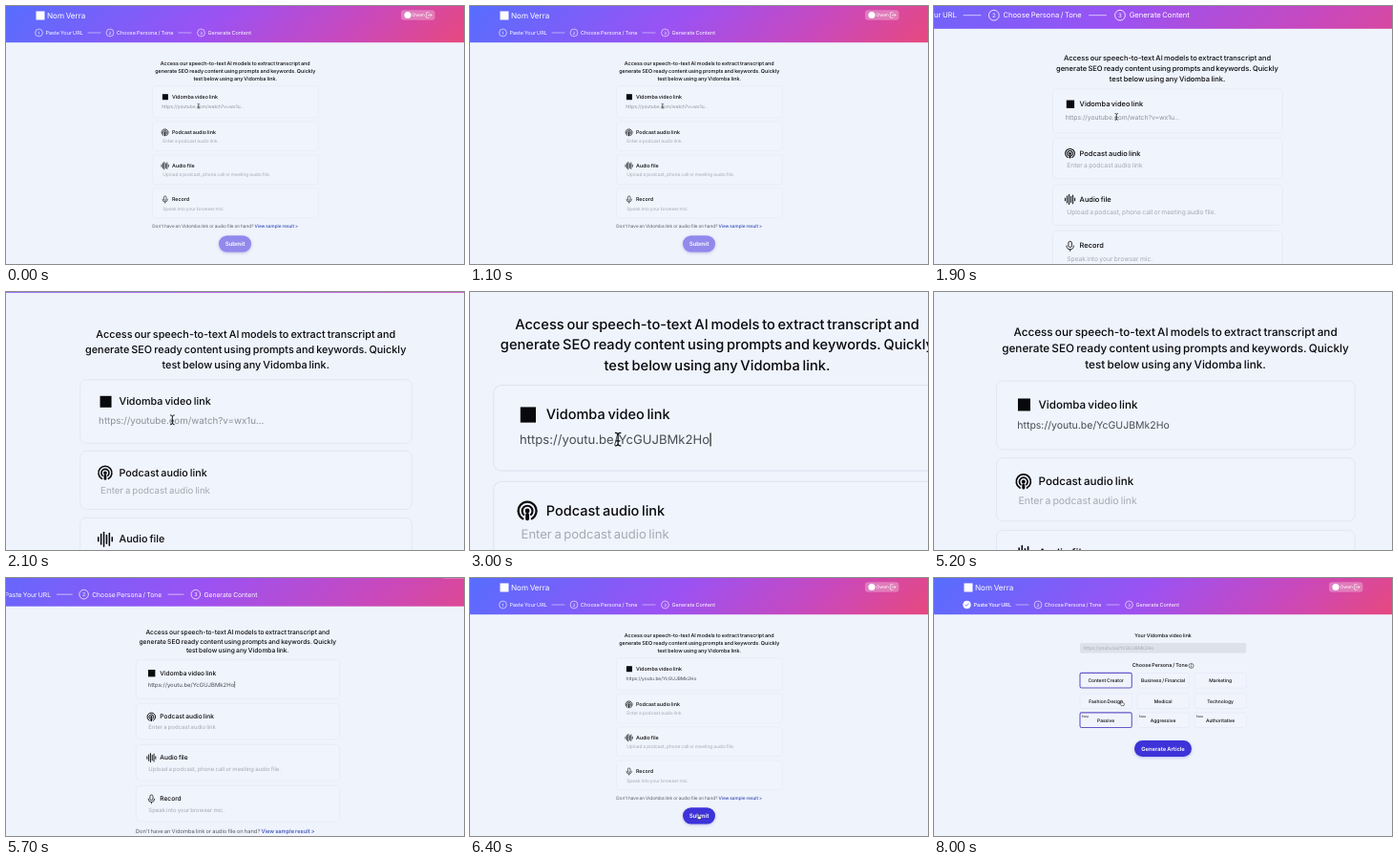
Write an HTML page that moves like this. It is 480 px wide and 270 px high and loops after 8100 ms.

```html
<!DOCTYPE html>
<html lang="en">
<head>
<meta charset="utf-8">
<title>Content generator demo</title>
<style>
  html, body { margin: 0; width: 100%; height: 100%; overflow: hidden; background: #eff3fc; }
  svg { display: block; width: 480px; height: 270px; }
  text { font-family: Inter, "Open Sans", sans-serif; word-spacing: -.08em; text-rendering: geometricPrecision; white-space: pre; }
  .button { filter: drop-shadow(0 1px 1.5px rgba(70, 60, 190, .3)); }
</style>
</head>
<body>
<svg id="stage" viewBox="0 0 480 270">
  <defs>
    <linearGradient id="banner" gradientUnits="userSpaceOnUse" x1="110.5" y1="-110.5" x2="369.5" y2="148.5">
      <stop offset="0" stop-color="#566eff"/>
      <stop offset=".45" stop-color="#9b52f3"/>
      <stop offset=".75" stop-color="#c948bb"/>
      <stop offset="1" stop-color="#e8497f"/>
    </linearGradient>
  </defs>
  <rect width="480" height="270" fill="#eff3fc"/>
  <g id="camera"></g>
</svg>
<script>
const LOOP = 8100;
const FOCUS = { x: 229.25, y: 75.6 };
const INK = '#08090c', INDIGO = '#3d33d8', EDGE = '#e0e5f2';
const URL_TEXT = 'https://youtu.be/YcGUJBMk2Ho';

// Scene times in ms
const T = { zoomIn: 1800, zoomedIn: 2640, paste: 2850, hideBeam: 3700,
            zoomOut: 4913, zoomedOut: 5823, hand: 5850, next: 7000 };

const camera = document.getElementById('camera');

function add(parent, tag, attrs = {}, content) {
  const el = document.createElementNS('http://www.w3.org/2000/svg', tag);
  for (const key in attrs) el.setAttribute(key, attrs[key]);
  if (content !== undefined) el.textContent = content;
  parent.append(el);
  return el;
}

const group = (parent, attrs) => add(parent, 'g', attrs);

const box = (parent, x, y, width, height, rx, attrs) =>
  add(parent, 'rect', { x, y, width, height, rx, ...attrs });

const line = (parent, d, stroke, width, attrs) =>
  add(parent, 'path', { d, fill: 'none', stroke, 'stroke-width': width, 'stroke-linecap': 'round', ...attrs });

const dot = (parent, cx, cy, r, attrs) => add(parent, 'circle', { cx, cy, r, ...attrs });

// y is the middle of the capitals
function label(parent, str, x, y, size, { fill = INK, weight = 400, anchor = 'start' } = {}) {
  return add(parent, 'text', { x, y: y + size * .355, 'font-size': size, fill,
    'font-weight': weight, 'text-anchor': anchor }, str);
}

function button(parent, str, x, y, w, h, size) {
  const g = group(parent, { class: 'button' });
  const body = box(g, x, y, w, h, h / 2, { fill: INDIGO });
  label(g, str, x + w / 2, y + h / 2, size, { fill: '#fff', weight: 600, anchor: 'middle' });
  return body;
}

// Header
const header = group(camera);
box(header, 0, 0, 480, 38.2, 0, { fill: 'url(#banner)' });
box(header, 31.5, 5.5, 9, 9, 0, { fill: '#fff' });
label(header, 'Nom Verra', 43, 9.8, 8.1, { fill: '#fff' });
box(header, 414, 4.3, 35.5, 10.4, 3, { fill: '#fff', opacity: .28 });
dot(header, 421, 9.5, 3.6, { fill: '#fff' });
label(header, 'Owen', 425.6, 9.6, 4.9, { fill: '#fff' });
line(header, 'M443 6.8H440.6V12.2H443M442.4 9.5H446M444.6 8L446.1 9.5L444.6 11', '#fff', .6);

const steps = [[34.5, 'Paste Your URL'], [109, 'Choose Persona / Tone'], [204.5, 'Generate Content']];
const stepParts = steps.map(([x, str], i) => {
  const ring = dot(header, x, 28, 3.9, { fill: 'none', stroke: '#fff', 'stroke-width': .6 });
  const num = label(header, i + 1, x, 28, 4.4, { fill: '#fff', anchor: 'middle' });
  const name = label(header, str, x + 7, 28, 5.5, { fill: '#fff' });
  return { ring, num, name };
});
line(header, 'M86 28H99M181 28H194', '#fff', .6, { opacity: .8 });
const tick = line(header, 'M32.8 28.1L34 29.3L36.3 26.8', '#6d5df5', .8);

// First page
const pageOne = group(camera);
['Access our speech-to-text AI models to extract transcript and',
 'generate SEO ready content using prompts and keywords. Quickly',
 'test below using any Vidomba link.'].forEach((str, i) =>
  label(pageOne, str, 240.25, 60 + i * 7.95, 5.43, { weight: 500, anchor: 'middle' }));

const fields = [
  { top: 83.7, h: 33.2, y: 95, name: 'Vidomba video link' },
  { top: 121, h: 30.5, y: 132.2, name: 'Podcast audio link', hintY: 141.4, hint: 'Enter a podcast audio link' },
  { top: 156, h: 30.7, y: 167, name: 'Audio file', hintY: 176.6, hint: 'Upload a podcast, phone call or meeting audio file.' },
  { top: 191, h: 30.7, y: 202.2, name: 'Record', hintY: 211.8, hint: 'Speak into your browser mic.' }
];
for (const f of fields) {
  box(pageOne, 153.5, f.top, 173.8, f.h, 3.2, { fill: '#f0f4fc', stroke: EDGE, 'stroke-width': .4 });
  label(pageOne, f.name, 173.9, f.y, 5.38, { weight: 500 });
  if (f.hint) label(pageOne, f.hint, 164.2, f.hintY, 4.84, { fill: '#a5a9b4' });
}

box(pageOne, 163.9, 92.2, 6, 6, 0, { fill: INK });

line(pageOne, 'M164.9 135.5A3.5 3.5 0 1 1 168.3 135.5M165.2 133.9A2 2 0 1 1 168 133.9', INK, .8);
dot(pageOne, 166.6, 132.4, .9, { fill: INK });
line(pageOne, 'M166.6 133.9V135.5', INK, 1.4);

[1, 2.6, 3.7, 2.2, 3.2, 1].forEach((r, i) => {
  const x = 163 + i * 1.45;
  line(pageOne, `M${x} ${167.2 - r}V${167.2 + r}`, INK, .75);
});

box(pageOne, 165.4, 198.9, 2.6, 4.5, 1.3, { fill: 'none', stroke: INK, 'stroke-width': .6 });
line(pageOne, 'M164 202.3A2.7 2.7 0 0 0 169.4 202.3M166.7 205V206.2', INK, .6);

const placeholder = label(pageOne, 'https://youtube.com/watch?v=wx1u...', 163.2, 104.9, 4.9, { fill: '#8b8f99' });
const value = label(pageOne, URL_TEXT, 163.6, 104.9, 4.86, { fill: '#484b54' });
const caretX = 163.9 + value.getComputedTextLength();
const caret = line(pageOne, `M${caretX} 102.3V107.2`, INK, .4);

const foot = label(pageOne, "Don't have an Vidomba link or audio file on hand? ", 153.2, 230, 4.7, { fill: '#565a66' });
add(foot, 'tspan', { fill: '#3449b4', 'font-weight': 500 }, 'View sample result >');
const submit = button(pageOne, 'Submit', 223, 240.2, 34, 17.2, 6.1);

// Second page
const pageTwo = group(camera);
const heading = { weight: 500, anchor: 'middle' };
label(pageTwo, 'Your Vidomba video link', 240, 60, 5.25, heading);
box(pageTwo, 153, 68, 174.2, 10.6, 1.6, { fill: '#dee1e9' });
label(pageTwo, URL_TEXT, 156.4, 73.3, 4.86, { fill: '#a4a8b3' });
label(pageTwo, 'Choose Persona / Tone', 236.8, 91.5, 5.35, heading);
dot(pageTwo, 269.6, 91.9, 2.5, { fill: 'none', stroke: INK, 'stroke-width': .5 });
line(pageTwo, 'M269.6 91.7V93.2M269.6 90.5V90.6', INK, .5);

const choices = [
  ['Content Creator', 'Business / Financial', 'Marketing'],
  ['Fashion Design', 'Medical', 'Technology'],
  ['Passive', 'Aggressive', 'Authoritative']
];
choices.forEach((row, r) => row.forEach((str, c) => {
  const x = 153 + c * 60, y = [99.4, 120.9, 140.9][r];
  const on = c === 0 && r !== 1;
  box(pageTwo, x, y, 54.3, 15.6, 1.8, { fill: '#f1f4fc',
    stroke: on ? '#6558c8' : EDGE, 'stroke-width': on ? 1.1 : .5 });
  label(pageTwo, str, x + 27.1, y + 8, 4.95, heading);
  if (r === 2) label(pageTwo, 'Tone', x + 1.8, y + 4, 3, { weight: 500 });
}));
button(pageTwo, 'Generate Article', 210, 170, 60, 17, 5.85);

// Pointers
const beam = group(camera);
line(beam, 'M200.8 102.2Q201.8 102.2 201.8 103V106.4Q201.8 107.2 200.8 107.2M202.8 102.2Q201.8 102.2 201.8 103M201.8 106.4Q201.8 107.2 202.8 107.2M201.1 105.3H202.5', INK, .45);
const hand = add(camera, 'path', {
  d: 'M-.9 -2.2Q-.9 -3 -.3 -3T.3 -2.2V-.6L1.9 -.2Q2.5 0 2.4 .8L2 2.6H-.8L-2.3 .7Q-2.4 0 -1.7 .1L-.9 .6Z',
  fill: '#fff', stroke: INK, 'stroke-width': .5, 'stroke-linejoin': 'round' });

// Pointer stops: time, x, y
const path = [[5850, 202, 105], [6300, 240, 250], [7250, 240, 250], [7850, 197, 131]];

const clamp01 = v => Math.min(1, Math.max(0, v));
const span = (t, a, b) => clamp01((t - a) / (b - a));
const smooth = p => p * p * (3 - 2 * p);
const show = (el, on) => el.setAttribute('visibility', on ? 'visible' : 'hidden');

function handAt(t) {
  let [, x, y] = path[0];
  for (let i = 1; i < path.length; i++) {
    const p = smooth(span(t, path[i - 1][0], path[i][0]));
    x += (path[i][1] - path[i - 1][1]) * p;
    y += (path[i][2] - path[i - 1][2]) * p;
  }
  return `translate(${x} ${y})`;
}

function zoomAt(t) {
  const into = 1 - (1 - span(t, T.zoomIn, T.zoomedIn)) ** 2;
  return 1 + 1.7 * (into - span(t, T.zoomOut, T.zoomedOut));
}

function draw(t) {
  const s = zoomAt(t);
  camera.setAttribute('transform', `translate(${FOCUS.x * (1 - s)} ${FOCUS.y * (1 - s)}) scale(${s})`);

  const pasted = t >= T.paste, second = t >= T.next;
  pageOne.setAttribute('display', second ? 'none' : 'inline');
  pageTwo.setAttribute('display', second ? 'inline' : 'none');
  show(placeholder, !pasted);
  show(value, pasted);
  show(caret, pasted && t < 6100 && (t + 400) % 1000 < 500);
  submit.setAttribute('fill', pasted ? INDIGO : '#9189ec');

  const first = stepParts[0];
  first.ring.setAttribute('fill', second ? '#fff' : 'none');
  first.name.setAttribute('font-weight', second ? 500 : 400);
  show(first.num, !second);
  show(tick, second);

  show(beam, t < T.hideBeam);
  show(hand, t >= T.hand);
  hand.setAttribute('transform', handAt(t));
}

const start = performance.now();
function tickFrame() {
  draw((performance.now() - start) % LOOP);
  requestAnimationFrame(tickFrame);
}
tickFrame();
</script>
</body>
</html>
```
